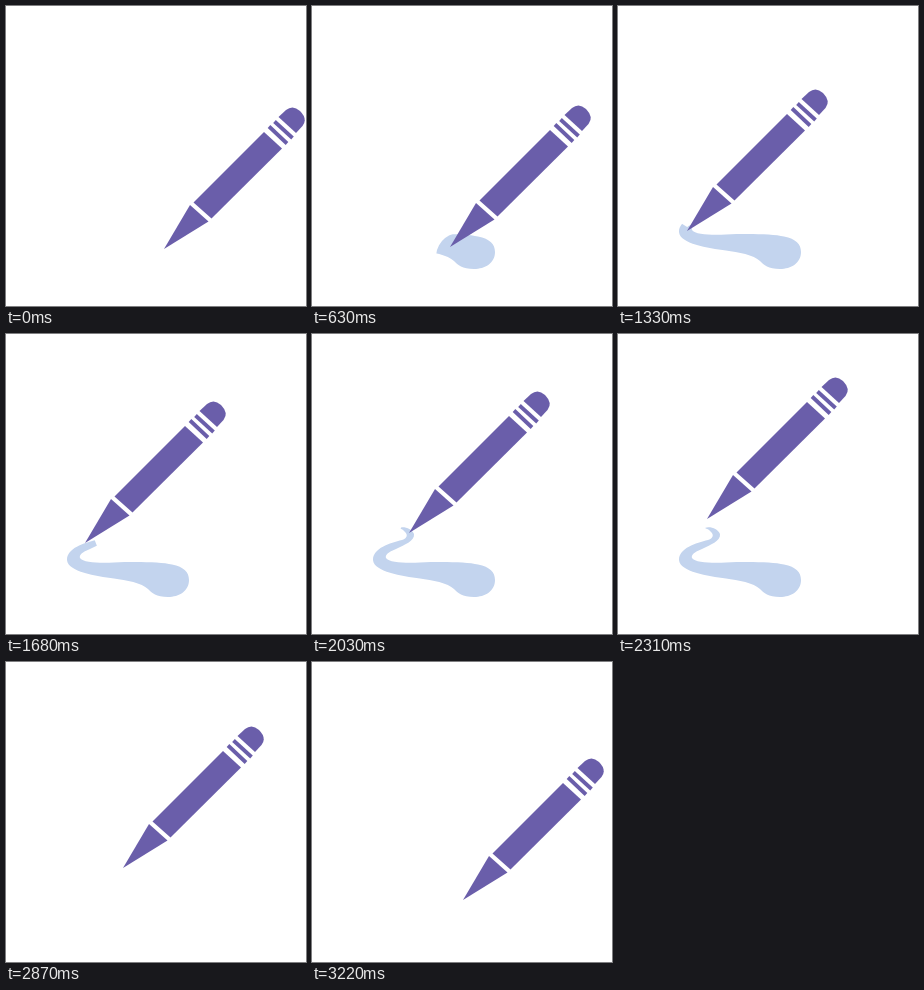
An HTML page that plays this animation: 300x300 px, repeating every 3.29 s.

```html
<!DOCTYPE html>
<html lang="en">
<head>
<meta charset="utf-8">
<title>Pencil drawing</title>
<style>
  html, body { margin: 0; width: 100%; height: 100%; overflow: hidden; background: #fff; }
  svg { display: block; width: 100%; height: 100%; }
  #reveal path { fill: none; stroke: #fff; stroke-dasharray: 1 4; stroke-dashoffset: 1; }
  #body { stroke-width: 48; stroke-linecap: round; }
  #tail { stroke-width: 19; }
  #pencil { fill: #6a5eaa; stroke: #6a5eaa; stroke-width: 0; }
  #pencil .band { stroke-width: 3.8; }
</style>
</head>
<body>
<svg viewBox="0 0 300 300">
  <mask id="reveal" maskUnits="userSpaceOnUse" x="0" y="0" width="300" height="300">
    <path id="body" pathLength="1" d="M207 250 L150 251 L95 245 L84 240"/>
    <path id="tail" pathLength="1" d="M69 235 L67 227 C67 216 82 211 91 207.500 C102 203 101 195 84 193"/>
  </mask>
  <g mask="url(#reveal)">
    <path id="ink" d="M87 194 C92 192 100 195 102 200 C103 207 92 211 84 215
      C76 218 73 221 74 224 C77 229 95 229 108 228.500 C130 227.500 155 228 166 230.500
      C178 233 183 238 183 246 C183 257 173 263 162 263 C150 263 146 259 142 255
      C136 249 120 246 108 244.500 C90 242 62 238 61 226 C61 214 78 209 90 206
      C96 204 96 200 92 197 C91 195 89 195.500 87 194Z"/>
  </g>
  <!-- The pencil's point sits at 0,0 -->
  <g id="pencil">
    <path d="M0 0 L26 -44 L44.500 -27.500Z"/>
    <path d="M29.500 -46.500 L100 -117 L118 -100.500 L47.500 -30.500Z"/>
    <path class="band" d="M105 -122.500 L123 -105.500"/>
    <path class="band" d="M110.500 -127.500 L128.500 -111"/>
    <path d="M114.500 -132 L122 -139 Q129 -144.500 136 -138 Q144 -130 138.500 -123 L132 -116Z"/>
  </g>
</svg>
<script>
  const FRAME_MS = 70, FRAMES = 47;
  const byId = id => document.getElementById(id);

  const linear = p => p;
  const speedUp = p => p ** 3 * (3 - 2 * p);
  const progress = (frame, from, to) => Math.min(1, Math.max(0, (frame - from) / (to - from)));

  // One leg of the point's trip: frames it spans, route and easing.
  function leg(from, to, d, ease = linear) {
    const path = document.createElementNS('http://www.w3.org/2000/svg', 'path');
    path.setAttribute('d', d);
    const length = path.getTotalLength();
    return { to, at: frame => path.getPointAtLength(length * ease(progress(frame, from, to))) };
  }

  const trip = [
    leg(0, 19, 'M158 243 C140 241 120 240 108 238 C98 236 75 231 69 225', speedUp),
    leg(19, 29, 'M69 225 C65 219 72 213 78 210 S96 206 97 199'),
    leg(29, 36, 'M97 199 L83.5 174'),
    leg(36, FRAMES, 'M83.5 174 L158 244')
  ];

  function draw(now) {
    const frame = Math.floor(now / FRAME_MS) % FRAMES;

    const { x, y } = trip.find(part => frame < part.to).at(frame);
    byId('pencil').setAttribute('transform', `translate(${Math.round(x)} ${Math.round(y)})`);

    byId('body').style.strokeDashoffset = 1 - progress(frame, 0, 19);
    byId('tail').style.strokeDashoffset = 1 - progress(frame, 16, 30);

    // The ink turns slightly violet while it fades.
    const fade = progress(frame, 35, 40);
    byId('ink').style.fill = `hsl(${216 + 20 * fade}, ${56 - 20 * fade}%, 85%)`;
    byId('ink').style.opacity = 1 - fade;

    requestAnimationFrame(draw);
  }
  draw(performance.now());
</script>
</body>
</html>
```
